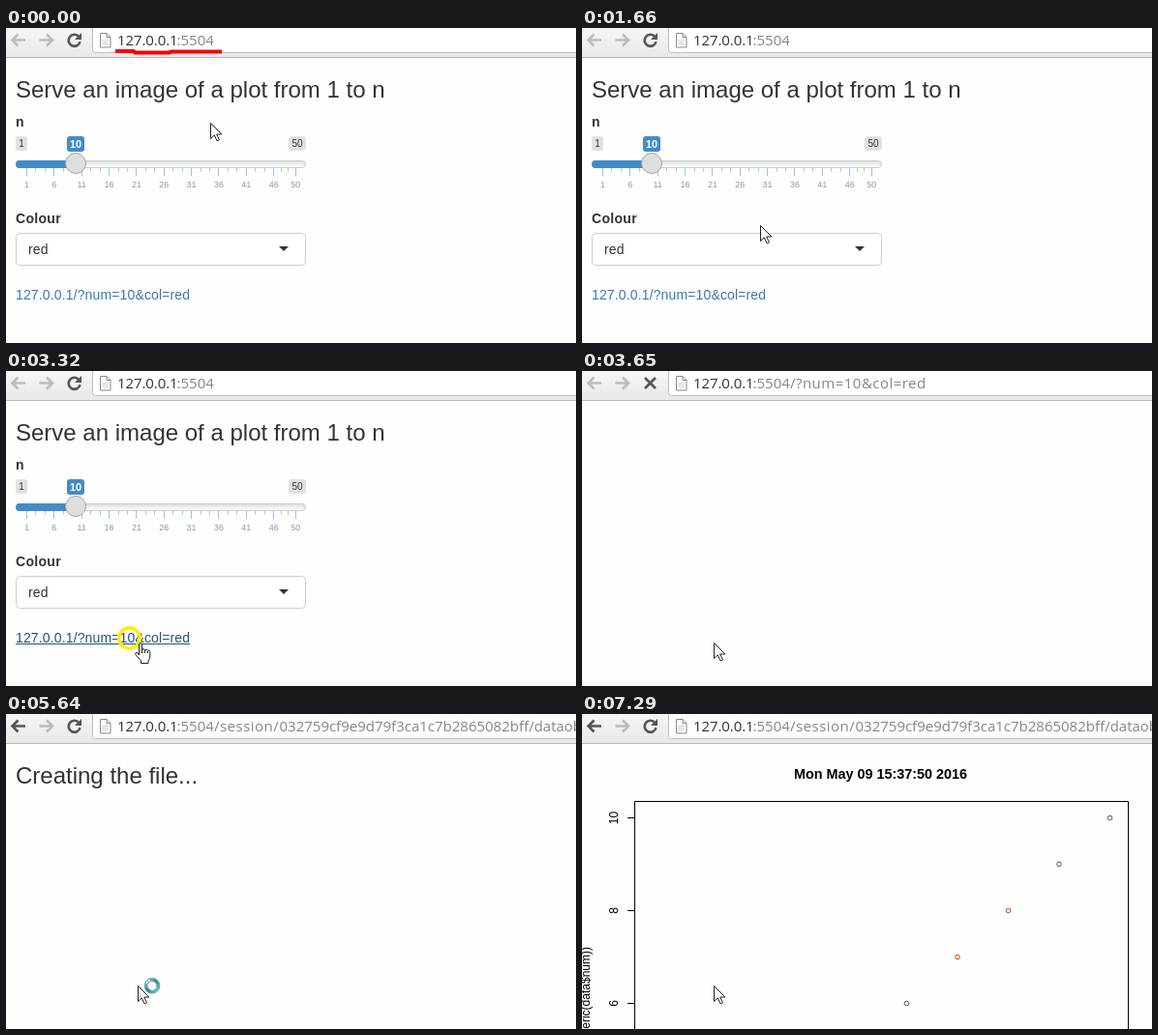
Animation of 589x326 px, one loop 9270 ms. Source, as an HTML page:

```html
<!DOCTYPE html>
<html lang="en">
<head>
<meta charset="utf-8">
<title>Plot service demo</title>
<style>
  html, body { margin: 0; width: 100%; height: 100%; overflow: hidden; background: #fefefe; }
  svg { display: block; font: 14px "Liberation Sans", sans-serif; fill: #333; }
  text { white-space: pre; }
  .url { font: 15px "Open Sans", sans-serif; fill: #858585; }
  .host { fill: #333; letter-spacing: -.1px; }
  .path { letter-spacing: .48px; }
  .heading { font-size: 24px; }
  .label { font-weight: bold; letter-spacing: .3px; }
  .body { letter-spacing: .14px; }
  .tag { font-size: 10px; text-anchor: middle; }
  .grid text { font-size: 9px; fill: #909aa0; text-anchor: middle; }
  .marker { fill: none; stroke: #f50008; stroke-linecap: square; stroke-linejoin: round; }
  .icon { fill: none; stroke: #555; stroke-width: 2.6; }
  .pale { stroke: #bcbcbc; }
  .plot { font-size: 12px; fill: #000; }
  .plot path, .plot circle { fill: none; stroke: #000; }
</style>
</head>
<body>
<svg width="589" height="326" viewBox="0 0 589 326">
  <defs>
    <linearGradient id="bar" x2="0" y2="1">
      <stop stop-color="#f5f5f5"/><stop offset="1" stop-color="#e9e9e9"/>
    </linearGradient>
    <linearGradient id="track" x2="0" y2="1">
      <stop stop-color="#ddd"/><stop offset="1" stop-color="#fff"/>
    </linearGradient>
    <linearGradient id="teal" x2="1" y2="1">
      <stop stop-color="#8fc9cb"/><stop offset=".5" stop-color="#2f8591"/><stop offset="1" stop-color="#7fd6cd"/>
    </linearGradient>
    <path id="back" d="M20 12.5H7M12.5 6.5l-6 6 6 6"/>
    <path id="arrow" d="M.5.5v16l3.8-3.6 2.8 6 2.4-1.1-2.8-5.8h5.2z" fill="#fff" stroke="#222"/>
  </defs>

  <rect width="589" height="326" fill="#fefefe"/>

  <!-- browser bar -->
  <rect width="589" height="30" fill="url(#bar)"/>
  <path d="M0 30.5H589" stroke="#b9b9b9"/>
  <path d="M89.5-1V22.5q0 3 3 3H590V-1z" fill="#fff" stroke="#bdbdbd"/>
  <use href="#back" class="icon pale" data-on="0 5640"/>
  <use href="#back" class="icon" data-on="5640 9270"/>
  <use href="#back" class="icon pale" transform="matrix(-1 0 0 1 54.5 0)"/>
  <g data-on="0 3650"><use href="#reload"/></g>
  <g data-on="4640 9270">
    <g id="reload"><path class="icon" d="M75.3 9A6 6 0 1 0 76.5 14.2"/><path d="M78 5v7h-7z" fill="#555"/></g>
  </g>
  <path class="icon" d="M65 7l11 11M76 7l-11 11" data-on="3650 4640"/>
  <path d="M97.5 5.5h6.5l4 4v10.500h-10.500zM104 5.500v4h4" fill="#fafafa" stroke="#8a8a8a"/>
  <path d="M99.500 12.500h6M99.500 14.500h6M99.500 16.500h6" stroke="#d5d5d5"/>
  <g class="url">
    <text class="host" x="115" y="18">127.0.0.1</text>
    <text x="176.500" y="18">:5504</text>
    <text class="path" x="215" y="18" data-on="3650 5640">/?num=10&amp;col=red</text>
    <g data-on="5640 9270">
      <text class="path" x="215" y="18">/session/</text>
      <text x="282.500" y="18">032759cf9e9d79f3ca1c7b2865082bff/dataobj</text>
    </g>
  </g>

  <!-- form -->
  <g data-on="0 3650">
    <text class="heading" x="10" y="72">Serve an image of a plot from 1 to n</text>
    <text class="label" x="10" y="102">n</text>
    <g class="tag">
      <rect x="10" y="112" width="12" height="15" rx="3" fill="#e1e1e1"/>
      <text x="16" y="123">1</text>
      <rect x="292" y="112" width="18" height="15" rx="3" fill="#e1e1e1"/>
      <text x="301" y="123">50</text>
      <rect x="63" y="112" width="18" height="16" rx="3" fill="#428bca"/>
      <text x="72" y="124" fill="#fff" font-size="11" font-weight="bold">10</text>
    </g>
    <rect x="10.500" y="137.500" width="299" height="7" rx="3.500" fill="url(#track)" stroke="#ccc"/>
    <path d="M72 137H14a4 4 0 0 0 0 8h58z" fill="#428bca"/>
    <g class="grid" id="grid"></g>
    <circle cx="72" cy="140" r="10.500" fill="#dedede" stroke="#a5a5a5"/>
    <text class="label" x="10" y="202">Colour</text>
    <rect x="10.500" y="212.500" width="299" height="33" rx="4" fill="#fff" stroke="#ccc"/>
    <text class="body" x="23" y="234">red</text>
    <path d="M282 226h10l-5 5z"/>
    <text class="body" x="10" y="281" fill="#3a78ad" data-on="0 1990">127.0.0.1/?num=10&amp;col=red</text>
    <g fill="#23527c" data-on="1990 3650">
      <text class="body" x="10" y="281">127.0.0.1/?num=10&amp;col=red</text>
      <rect x="10" y="282" width="180" height="1"/>
    </g>
  </g>

  <text class="heading" x="10" y="72" data-on="5640 5970">Creating the file...</text>

  <!-- plot -->
  <g class="plot" data-on="5970 9270">
    <text x="308.500" y="67" font-size="14.400" font-weight="bold" text-anchor="middle">Mon May 09 15:37:50 2016</text>
    <path d="M54.500 330V90.500H564.500V330"/>
    <text transform="translate(8 241) rotate(-90)" text-anchor="end">as.numeric(data$num))</text>
    <g id="points"></g>
  </g>

  <!-- red marker strokes -->
  <g class="marker">
    <path stroke-width="4" d="M115 24H132L133 25.500H168L171 24.500H221" data-on="0 1000"/>
    <g stroke-width="4" data-on="2320 3320">
      <path d="M115 24.500H150L160 25.500 180 24H218"/>
      <path d="M12 287H80L95 288H150L188 287"/>
    </g>
    <path stroke-width="5" d="M120.500 25.500H140L150 27.500 200 28.500 263 27.500 267 24.500H285L300 26.500 335 27 345 25.500H360" data-on="4640 5640"/>
  </g>

  <!-- pointers -->
  <circle cx="127.500" cy="276.500" r="10.800" fill="none" stroke="#ffef00" stroke-width="3.400" data-on="3320 3650"/>
  <use href="#arrow" x="211" y="98" data-on="0 1330"/>
  <use href="#arrow" x="209" y="107" data-on="1330 1660"/>
  <use href="#arrow" x="184" y="204" data-on="1660 1990"/>
  <g transform="translate(133 281)" fill="#fff" stroke="#222" data-on="1990 3650">
    <path d="M4.500 13V2q0-1.500 1.500-1.500T7.500 2V7q1.500-1 3 .5 1.500-1 3 .7 2-.7 2.300 1.300V14q0 3-1.800 5v2.500H6.500V19L1 12.500q-.8-2 .8-2.300 1.200 0 2.700 2.800z"/>
    <path d="M7.500 7v4M10.500 8v3M13.500 9v2"/>
  </g>
  <use href="#arrow" x="136" y="281" data-on="3650 9270"/>
  <g data-on="3980 7290"><use href="#busy"/></g>
  <g data-on="3980 4640"></g>
  <defs>
    <g id="busy">
      <path d="M137.500 284v11l2.500-2.500z" fill="#9fe8da"/>
      <circle cx="151" cy="281.300" r="6.300" fill="#fff" stroke="url(#teal)" stroke-width="3.400"/>
      <circle cx="151" cy="281.300" r="7.900" fill="none" stroke="#4d8f98" stroke-width=".6"/>
      <path d="M145 279a6.300 6.300 0 0 1 4-3.800" fill="none" stroke="#d5f3f0" stroke-width="1.500"/>
    </g>
  </defs>
</svg>
<script>
const LOOP = 9270;
const byId = id => document.getElementById(id);

const sliderX = value => 21.5 + (value - 1) * 5.67;
const tick = (x, height, color) =>
  `<rect x="${Math.round(x - .5)}" y="145" width="1" height="${height}" fill="${color}"/>`;
let grid = "";
for (let value = 1; value <= 50; value += 5) {
  const next = Math.min(value + 5, 50), x = sliderX(value), gap = (sliderX(next) - x) / 3;
  grid += tick(x, 8, "#9fc3d8") + tick(x + gap, 4, "#c4c8ca") + tick(x + 2 * gap, 4, "#c4c8ca");
  grid += `<text x="${x}" y="165">${value}</text>`;
}
byId("grid").innerHTML = grid + tick(sliderX(50), 8, "#9fc3d8") + `<text x="${sliderX(50)}" y="165">50</text>`;

let points = "";
for (let n = 10; n >= 6; n--) {
  const x = 545.5 - (10 - n) * 52.5, y = 107.5 + (10 - n) * 48;
  const color = n === 7 || n === 8 ? "#d83a10" : "#555";
  points += `<circle cx="${x}" cy="${y}" r="2.3" style="stroke:${color}"/>`;
  if (n % 2 === 0) points += `<path d="M47 ${y}h7"/>
    <text transform="translate(37 ${y}) rotate(-90)" text-anchor="middle">${n}</text>`;
}
byId("points").innerHTML = points;

const parts = [...document.querySelectorAll("[data-on]")].map(node => {
  const [from, to] = node.dataset.on.split(" ").map(Number);
  return { node, from, to };
});
const start = performance.now();
function draw(now) {
  const t = Math.max(0, now - start) % LOOP;
  for (const { node, from, to } of parts) node.style.display = t >= from && t < to ? "" : "none";
  requestAnimationFrame(draw);
}
draw(start);
</script>
</body>
</html>
```
